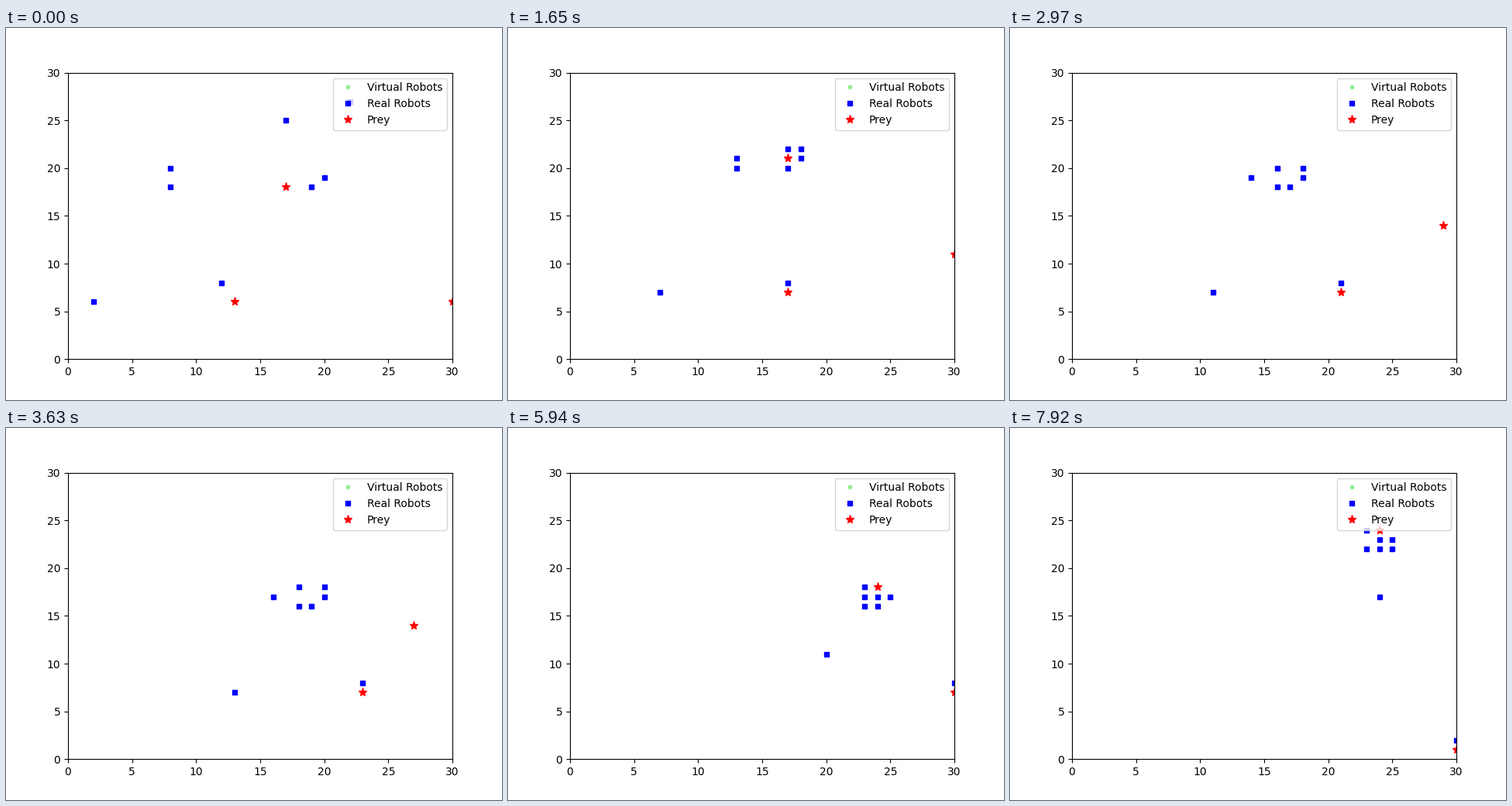
Recreate the animation shown at these times as a matplotlib script. Size 640 by 480 pixels, loop 8 s.

```python
import numpy as np
import matplotlib.pyplot as plt
from matplotlib.animation import FuncAnimation

LOOP, TICK, STEP = 8000, 40, 330  # ms
COMPASS = {"N": (0, 1), "S": (0, -1), "E": (1, 0), "W": (-1, 0), "O": (0, 0)}


def walk(x, y, route):
    """Grid positions along a route such as 'NE E2 O' (O means wait)."""
    path = [(x, y)]
    for leg in route.split():
        heading = leg.rstrip("0123456789")
        move = np.sum([COMPASS[c] for c in heading], axis=0)
        for _ in range(int(leg[len(heading):] or 1)):
            path.append(tuple(path[-1] + move))
    return path


robots = [
    walk(2, 6, "NE E13 NE8 N2"),
    walk(12, 8, "E18 S6"),
    walk(8, 20, "SE E NE2 E2 O S2 SE5 NE4 N6"),
    walk(8, 18, "E2 NE2 E3 S SE5 E2 N E N7"),
    walk(19, 18, "O W N2 W2 O S SE5 E2 N2 E N6"),
    walk(20, 19, "W O N2 W3 SE7 E N2 NE O N5"),
    walk(17, 25, "SE S2 O W3 S SE6 E N O NE2 N5"),
    walk(22, 27, "SW4 S W2 SE7 O N2 E NE N5"),
]
# a prey is gone once its route ends: it has been surrounded
prey = [
    walk(13, 6, "N E17 S6"),
    walk(30, 6, "N8 W6 N10"),
    walk(17, 18, "E N3 W3"),
]

fig, ax = plt.subplots(figsize=(6.4, 4.8), dpi=100)
ax.set_xlim(0, 30)
ax.set_ylim(0, 30)
ax.plot([], [], "o", color="lightgreen", ms=3, label="Virtual Robots")
robot_dots, = ax.plot([], [], "s", color="blue", ms=4, label="Real Robots")
prey_dots, = ax.plot([], [], "*", color="red", ms=8, label="Prey")
ax.legend(loc="upper right")


def place(dots, paths, step):
    dots.set_data(*zip(*[p[step] for p in paths if step < len(p)]))


def update(i):
    step = (i * TICK + TICK - 10) // STEP
    place(robot_dots, robots, step)
    place(prey_dots, prey, step)
    return robot_dots, prey_dots


anim = FuncAnimation(fig, update, frames=LOOP // TICK, interval=TICK,
                     repeat=True, repeat_delay=0)
plt.show()
```
